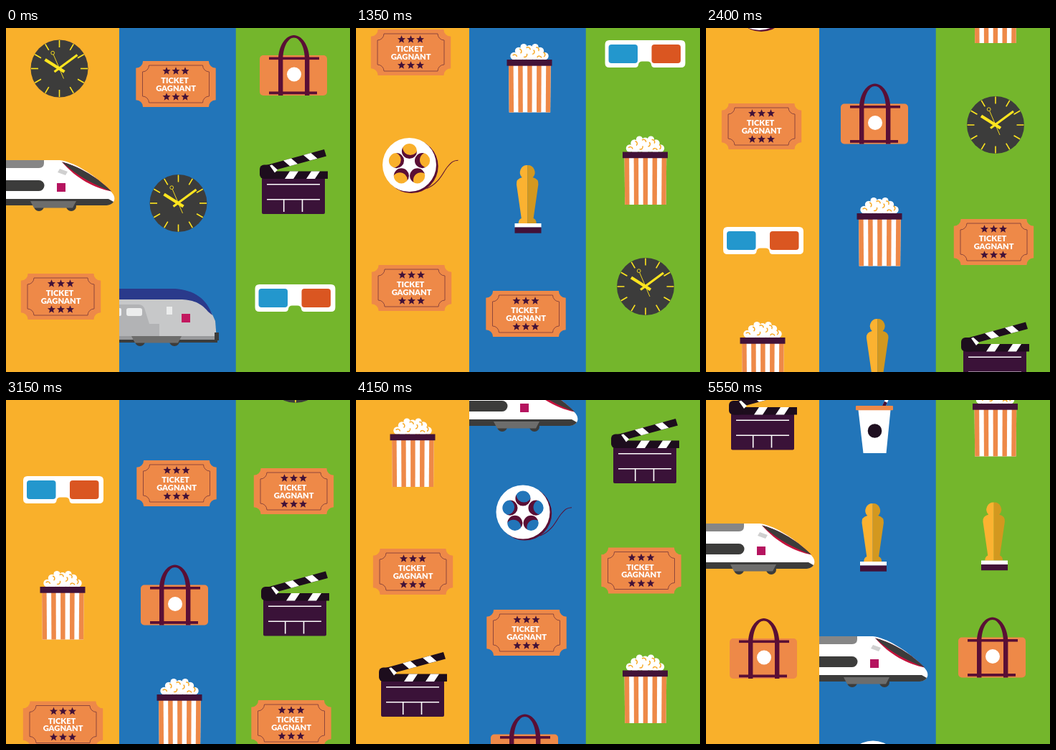
These frames come from a looping animation (480 by 479 pixels, 5.7 s). An HTML page:

```html
<!DOCTYPE html>
<html lang="fr">
<head>
<meta charset="utf-8">
<title>Ticket gagnant</title>
<style>
html, body { margin: 0; width: 100%; height: 100%; overflow: hidden; }
svg { display: block; }
#stage { width: 100vw; height: 100vh; }
text { font: 900 11.2px Lato, sans-serif; fill: #fff; text-anchor: middle; }
</style>
</head>
<body>
<svg id="stage" viewBox="0 0 480 479" preserveAspectRatio="none"></svg>
<script>
const PLUM = '#421238', WINE = '#5a0f35', ORANGE = '#ee8948', DARK = '#3c3c3b', YELLOW = '#ffe51f';

const rect = (x, y, w, h, fill, r = 0) =>
  `<rect x="${x}" y="${y}" width="${w}" height="${h}" rx="${r}" fill="${fill}"/>`;
const disc = (x, y, r, fill) => `<circle cx="${x}" cy="${y}" r="${r}" fill="${fill}"/>`;
const shape = (d, fill) => `<path d="${d}" fill="${fill}" fill-rule="evenodd"/>`;
const line = (d, color, w) => `<path d="${d}" fill="none" stroke="${color}" stroke-width="${w}"/>`;
const ring = (x, y, r) => `M${x - r},${y}a${r},${r} 0 1 0 ${2 * r},0a${r},${r} 0 1 0 ${-2 * r},0z`;
const polar = (a, r) => [r * Math.sin(a), -r * Math.cos(a)];

function star(x, y, r) {
  let d = '';
  for (let i = 0; i < 10; i++) {
    const [px, py] = polar(i * Math.PI / 5, i % 2 ? r * 0.45 : r);
    d += `${i ? 'L' : 'M'}${(x + px).toFixed(2)},${(y + py).toFixed(2)}`;
  }
  return shape(d + 'z', PLUM);
}

// Rectangle with concave corners, centred on the origin
function notched(w, h, r) {
  const arc = (x, y) => `a${r},${r} 0 0 0 ${x},${y}`;
  return `M${r - w},${-h}H${w - r}${arc(r, r)}V${h - r}${arc(-r, r)}H${r - w}${arc(-r, -r)}V${r - h}${arc(r, -r)}z`;
}

function clock() {
  let s = disc(0, 0, 40, DARK);
  for (let i = 0; i < 12; i++) {
    const a = i * Math.PI / 6;
    s += line(`M${polar(a, 29.5)}L${polar(a, 39.5)}`, YELLOW, 1.6);
  }
  return s + line('M7,4.5L-20,-12.5', YELLOW, 4.4) + line('M-7,4.5L25,-19', YELLOW, 3.2) +
    line('M6,14L-8.3,-19.5', YELLOW, 0.9) +
    `<circle cx="-9.3" cy="-21.8" r="2.4" fill="none" stroke="${YELLOW}" stroke-width=".9"/>`;
}

function ticket() {
  let s = shape(notched(55.7, 32, 9.8), ORANGE) + line(notched(46.5, 26, 9), '#84403c', 0.9);
  for (const y of [-18, 18]) for (const x of [-13, 0, 13]) s += star(x, y, 5.8);
  return s + '<text x="-1.5" y="-.6">TICKET</text><text x=".1" y="9.6">GAGNANT</text>';
}

function bag() {
  return rect(-47, -28, 94, 56, ORANGE, 5) +
    shape('M-21,-22C-21,-42 -10,-56 .7,-56S22.4,-42 22.4,-22H16C16,-39 9,-52.4 .7,-52.4S-14.6,-39 -14.6,-22z', WINE) +
    rect(-21, -23, 6.4, 51, WINE) + rect(16, -23, 6.4, 51, WINE) +
    rect(-34, -25.5, 70, 3.6, WINE) + rect(-34, 22.5, 67, 3.8, WINE) + disc(1, -1.5, 10, '#fff');
}

function clap() {
  const ink = '#1d0d1d';
  return rect(-44, -6, 88, 51, '#3a1238', 2) +
    rect(-40, -14.5, 88, 10.5, ink) + rect(-47, -23.5, 20, 19.5, ink, 6) +
    shape('M-43,-21.5L43,-45L46,-35.5L-30,-15z', ink) +
    shape('M-14,-29.4L-3,-32.4L6,-24.8L-5,-21.8z', '#fff') +
    shape('M14,-37.1L24.5,-40L33.5,-32.2L23,-29.4z', '#fff') +
    shape('M-33,-22.5L-30,-23.8L-22,-16.5L-26,-12.5z', '#fff') +
    shape('M-5,-14.5H7L0,-4H-12z', '#fff') + shape('M25,-14.5H37L30,-4H18z', '#fff') +
    line('M-37,3.7H37M-37,24.7H37M-13.3,25V42M12.5,25V42', '#fff', 1.6);
}

function glasses() {
  return shape('M-50,-19H50Q56,-19 56,-13V13Q56,19 50,19H13Q9,19 8.5,15Q8,10.5 3,10.5H-4Q-9,10.5 -9.5,15Q-10,19 -14,19H-50Q-56,19 -56,13V-13Q-56,-19 -50,-19z', '#fff') +
    rect(-51, -13, 40.5, 26, '#2397cd', 4) + rect(9, -13, 40.5, 26, '#da5621', 4);
}

function popcorn() {
  let s = '';
  const puffs = (n, half, y, r) => {
    for (let i = 0; i < n; i++) s += disc(-half + 2 * half * i / (n - 1), y + (i % 2) * 2, r, '#fff');
  };
  puffs(7, 21.5, -31, 5.2);
  puffs(5, 15, -38, 5.2);
  puffs(3, 8, -43.5, 4.6);
  for (const [x, y, a] of [[-20, -32, 20], [-12, -38, 80], [-5, -31, 140], [-1, -42, 30], [6, -36, 110], [12, -41, 60], [14, -30, 10], [21, -33, 90]])
    s += `<path d="M-3,1.5A3.2,3.2 0 0 1 3,1" transform="translate(${x},${y}) rotate(${a})" fill="none" stroke="#f6a823" stroke-width="1.5"/>`;
  const top = 29.3, foot = 28.7;
  let bars = shape(`M${-top},-18H${top}L${foot},47.5H${-foot}z`, '#fff');
  for (let i = 0; i < 9; i += 2) {
    const at = (k, half) => (-half + 2 * half * k / 9).toFixed(2);
    bars += shape(`M${at(i, top)},-18H${at(i + 1, top)}L${at(i + 1, foot)},47.5H${at(i, foot)}z`, ORANGE);
  }
  return s + `<g transform="translate(.4,0)">${bars}</g>` + rect(-31.5, -26, 63, 8.7, PLUM);
}

function reel() {
  // The hub behind shows through the inner side of each hole
  const plate = (dx, dy, reach) => {
    let d = ring(dx, dy, 37.5);
    for (let i = 0; i < 5; i++) {
      const [x, y] = polar(i * Math.PI * 0.4, reach);
      d += ring(x + dx / 2, y + dy / 2, 10.6);
    }
    return d;
  };
  return line('M24,33C42,26 47,10 53,3S61,-6 68,-6.3', WINE, 1.1) +
    shape(plate(2.7, 2, 25), WINE) + shape(plate(0, 0, 19), '#fff');
}

function statue() {
  const half = s => `M-.8,-47A10,10 0 0 ${s > 0 ? 1 : 0} ${s * 7.5 - 0.8},-30Q${s * 16 - 0.8},-28 ${s * 15.2 - 0.8},-20L${s * 8.4 - 0.8},27Q${s * 12.4 - 0.8},28.5 ${s * 12.4 - 0.8},34H-.8z`;
  return shape(half(-1), '#fbb231') + shape(half(1), '#d3981f') +
    rect(-18.5, 34, 37, 5.7, '#fff') + rect(-18.5, 39.5, 37, 8.2, PLUM);
}

function drink() {
  const straw = 'M14,-25L20,-38L28,-43';
  return line(straw, '#fff', 4.5) +
    `<path d="${straw}" fill="none" stroke="${PLUM}" stroke-width="4.5" stroke-dasharray="8 4"/>` +
    shape('M-21,-21H24L18,39H-14z', '#fff') +
    rect(-24.5, -27, 52, 6.3, ORANGE, 1) + disc(2, 8, 9.8, '#1f0f20');
}

const bogie = (x, y, gap, len) => disc(x + 12, y + 1, 7, DARK) + disc(x + 12 + gap, y + 1, 7, DARK) +
  shape(`M${x},${y - 6}h${len}l-5,9.5h${10 - len}z`, '#6d6d6c');

function fastTrain() {
  const glass = 'M78,2.5C96,7 124,20 147,43.5';
  return shape('M0,0H75C92,2 120,17 145,42C151,48 152,52 151,56C149,61 145,62.5 138,62.5H0z', '#fff') +
    shape('M0,54H143L150,58C148,61.5 144,63 138,63H0z', DARK) +
    shape('M0,0H53V4Q53,11 46,11H0z', '#868686') +
    shape('M0,28H46A7.4,7.4 0 0 1 46,43H0z', DARK) +
    shape(glass + 'C124,39 98,26 78,2.5z', '#c5123c') +
    shape(glass + 'C126,35 101,24 78,2.5z', DARK) +
    shape('M75,12L86,16L83,21L72,17z', '#d0d0d0') +
    rect(71, 32, 12, 12, '#b5145f') + bogie(34, 63, 45, 64);
}

function regioTrain() {
  return shape('M0,8H95C112,12 126,24 134,45L136,71H0z', '#c7c8c9') +
    shape('M0,0H78C105,2 122,14 130,37L124,32C112,17 98,15 82,15H0z', '#2a3a8b') +
    shape('M0,22H27Q34,22 36,30L42,49H56V66H0z', '#b2b3b5') +
    rect(0, 66, 137, 6, '#98999b') +
    rect(-4, 27, 7, 11, '#eceded', 2) + rect(10, 27, 22, 11, '#eceded', 3) +
    rect(66, 25, 8, 11, '#eceded') +
    rect(0, 71, 137, 4, DARK) + rect(133, 61, 6, 11, DARK) +
    bogie(17, 72, 48, 70) + rect(87, 35, 12, 12, '#c2185f');
}

// Columns: [left, width, colour, direction, travel at keys, items [draw, x, y]]
const KEYS = [0, 9, 16, 21, 27, 32, 36];
const SIDE = [0, 340, 565, 736, 948.5, 1150, 1320];
const MID = [0, 320, 534, 686, 894, 1089, 1250];
const COLUMNS = [
  [0, 158, '#f9b02b', -1, SIDE, [
    [clock, 74.5, 56.5], [fastTrain, 0, 184], [ticket, 76.5, 374], [reel, 74.5, 530.5],
    [ticket, 77.5, 702], [glasses, 80, 861], [popcorn, 79, 1022], [ticket, 79.5, 1187.5],
    [clap, 79, 1344.5], [fastTrain, 0, 1492], [bag, 80, 1680]]],
  [158, 163, '#2275b9', 1, MID, [
    [regioTrain, 158, 363], [clock, 240.5, 244], [ticket, 237, 78], [statue, 240, -82],
    [popcorn, 242, -250], [bag, 235, -400.5], [ticket, 238, -570], [reel, 233, -738],
    [fastTrain, 158, -921], [statue, 233.5, -1059], [drink, 233.5, -1215]]],
  [320.5, 159.5, '#74b62c', -1, SIDE, [
    [bag, 401, 66], [clap, 401, 214], [glasses, 403.5, 376], [popcorn, 403.5, 538.5],
    [clock, 404, 700], [ticket, 401.5, 863], [clap, 403, 1019.5], [ticket, 398, 1186],
    [popcorn, 403.5, 1351], [statue, 402.5, 1509.5], [bag, 399, 1678.5]]]
];

const stage = document.getElementById('stage');
stage.innerHTML = COLUMNS.map(([x, w, color, , , items]) =>
  `<svg x="${x}" y="0" width="${w}" height="479" viewBox="${x} 0 ${w} 479" overflow="hidden">` +
  rect(x, 0, w, 479, color) + '<g class="strip">' +
  items.map(([draw, ix, iy]) => `<g transform="translate(${ix},${iy})">${draw()}</g>`).join('') +
  '</g></svg>').join('');
const strips = [...stage.querySelectorAll('.strip')];

// Smooth Hermite curve through the key positions
function travel(pos, n) {
  const last = KEYS.length - 1;
  const rate = i => (pos[i + 1] - pos[i]) / (KEYS[i + 1] - KEYS[i]);
  const slope = i => {
    if (i === 0) return 1.5 * rate(0) - 0.5 * slope(1);
    if (i === last) return 1.5 * rate(last - 1) - 0.5 * slope(last - 1);
    const a = KEYS[i] - KEYS[i - 1], b = KEYS[i + 1] - KEYS[i];
    return (rate(i - 1) * b + rate(i) * a) / (a + b);
  };
  let k = 0;
  while (k < last - 1 && n >= KEYS[k + 1]) k++;
  const h = KEYS[k + 1] - KEYS[k], u = (n - KEYS[k]) / h, v = 1 - u;
  return pos[k] * v * v * (1 + 2 * u) + pos[k + 1] * u * u * (3 - 2 * u) +
    h * u * v * (slope(k) * v - slope(k + 1) * u);
}

// The strips advance in steps of 150 ms, with three slower ones of 200 ms
function stepAt(t) {
  if (t < 3750) return Math.floor(t / 150);
  if (t < 4350) return 25 + Math.floor((t - 3750) / 200);
  return Math.floor((t - 150) / 150);
}

function render(ms) {
  const n = stepAt(ms % 5700);
  COLUMNS.forEach(([, , , dir, pos], i) =>
    strips[i].setAttribute('transform', `translate(0,${(dir * travel(pos, n)).toFixed(2)})`));
}

let start;
function tick(now) {
  start ??= now;
  render(Math.max(0, now - start));
  requestAnimationFrame(tick);
}
render(0);
requestAnimationFrame(tick);
</script>
</body>
</html>
```
